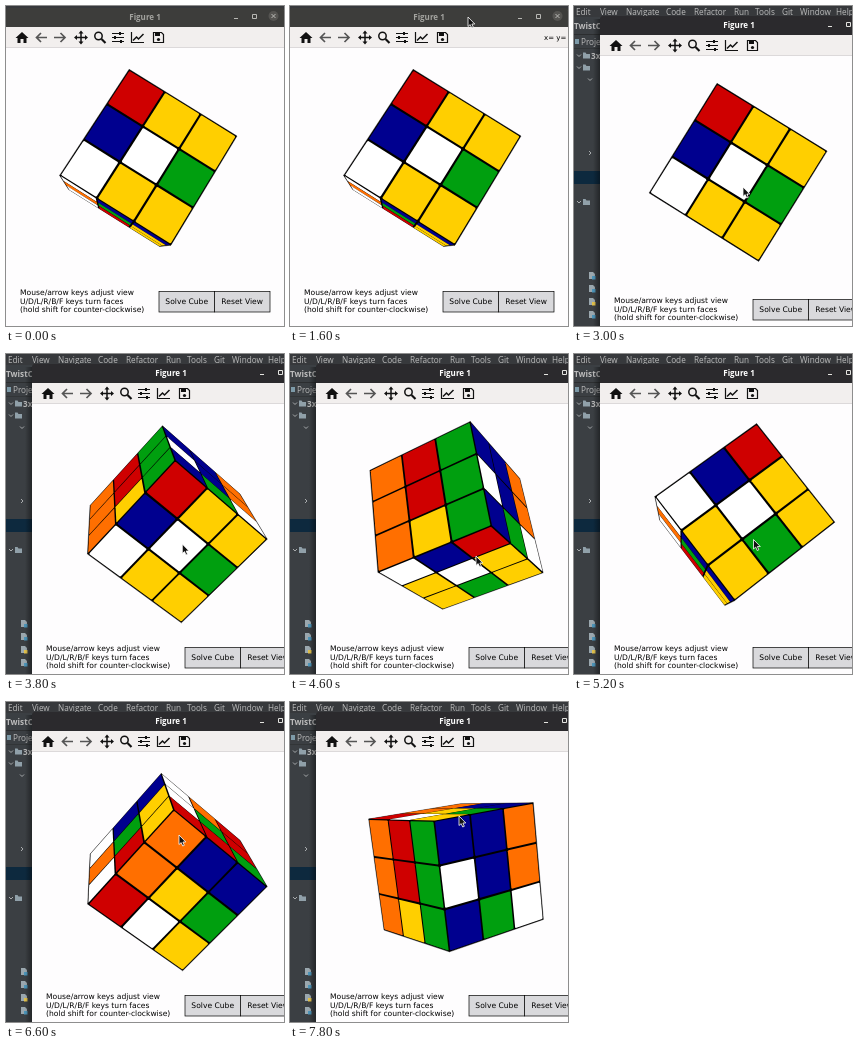
These frames come from a looping animation (278 by 320 pixels, 8000 ms). An HTML page:

```html
<!DOCTYPE html>
<html lang="en">
<head>
<meta charset="utf-8">
<title>Cube viewer</title>
<style>
  html, body { margin: 0; width: 100%; height: 100%; overflow: hidden; background: #3b3f43; }
  svg { display: block; width: 278px; height: 320px; }
  text { white-space: pre; }
  .ide { font-family: "Open Sans", sans-serif; font-size: 8.2px; fill: #bcbcbc; }
  .fig { font-family: "DejaVu Sans", sans-serif; font-size: 7.6px; fill: #000; }
  .title { font: bold 8px "Open Sans", sans-serif; text-anchor: middle; }
  .mid { text-anchor: middle; }
  .line { fill: none; stroke: #111; stroke-width: 1.5; }
</style>
</head>
<body>
<svg viewBox="0 0 278 320">
  <defs>
    <linearGradient id="shade"><stop offset="0" stop-opacity="0"/><stop offset="1" stop-opacity=".4"/></linearGradient>
  </defs>

  <g class="ide">
    <rect width="278" height="320" fill="#3b3f43"/>
    <rect width="278" height="11" fill="#37393c"/>
    <g id="menu"></g>
    <text x="0" y="23" font-weight="bold">TwistCube</text>
    <path d="M0 28.5H40" stroke="#2c2e30"/>
    <rect x="1" y="33" width="4" height="5" fill="#7d9aa8"/>
    <text x="7" y="39">Project</text>
    <path d="M0 42.5H40" stroke="#323537"/>
    <rect x="0" y="165" width="40" height="13" fill="#0d293e"/>
    <path d="M3 48.500l2 2 2-2M3 60.500l2 2 2-2M14 72.500l2 2 2-2M15 145l2 2-2 2M3 195l2 2 2-2" fill="none" stroke="#a8abad"/>
    <text x="17" y="53" font-weight="bold">3x3</text>
    <path d="M9 46.500h2.500l1 1.500h3.500v4.500h-7zM9 58.500h2.500l1 1.500h3.500v4.500h-7zM9 193h2.500l1 1.500h3.500v4.500h-7z" fill="#90a0a9"/>
    <g id="files"></g>
  </g>

  <g id="window">
    <rect x="-7" y="5" width="7" height="320" fill="url(#shade)"/>
    <path id="bar" d="M0 24V5Q0 2 3 2H275Q278 2 278 5V24Z"/>
    <text id="caption" class="title" x="139" y="13.800">Figure 1</text>
    <g id="controls" fill="none" stroke="#b8b8b4">
      <path d="M228 12.500h4M246.500 8.500h4v4h-4z"/>
      <circle cx="267.500" cy="10" r="5" fill="#555451" stroke="none"/>
      <path d="M265.500 8l4 4m0-4l-4 4"/>
    </g>
    <rect y="21" width="278" height="21" fill="#f2efee"/>
    <rect y="41" width="278" height="290" fill="#fefdfe"/>
    <path d="M0 41.500H278" stroke="#d4d1d1" stroke-width=".8"/>

    <path d="M9.500 32L16 26l6.500 6h-2v5h-3v-4h-3v4h-3v-5z" fill="#111"/>
    <path class="line" d="M41 31.500H30.500M35 27l-4.500 4.500 4.500 4.500M48 31.500h11M54.500 27l4.500 4.500-4.500 4.500" style="stroke:#555;stroke-width:1.700"/>
    <path class="line" d="M70 31.500h10M75 26.500v10"/>
    <path d="M75 24.500l2.500 3h-5zM75 38.500l2.500-3h-5zM68 31.500l3-2.500v5zM82 31.500l-3-2.500v5z" fill="#111"/>
    <circle class="line" cx="92.500" cy="30" r="3.700"/>
    <path class="line" d="M95.500 33l4 4" style="stroke-width:2.200"/>
    <path class="line" d="M106 27.500h12M106 31.500h12M106 35.500h12" style="stroke-width:1.200"/>
    <path d="M113 26h2v3h-2zM108 30h2v3h-2zM114 34h2v3h-2z" fill="#111"/>
    <path class="line" d="M125.500 26v10.500H138" style="stroke-width:1.200"/>
    <path class="line" d="M127 34.500l3.500-3.500 2 2 5-5"/>
    <path class="line" d="M147.500 26.500h8l2 2v8h-10z" style="stroke-width:1.200"/>
    <path d="M149 27h5v3h-5z" fill="#111"/>
    <circle cx="152.500" cy="33.500" r="1.600" fill="#111"/>
    <text id="coords" class="fig" x="254" y="34" style="font-size:7px">x= y=</text>

    <path id="body" fill="#000" stroke="#000" stroke-width=".4" stroke-linejoin="round"/>
    <g id="stickers"></g>

    <g class="fig">
      <text x="14" y="288.500">Mouse/arrow keys adjust view</text>
      <text x="14" y="297.500">U/D/L/R/B/F keys turn faces</text>
      <text x="14" y="306.300">(hold shift for counter-clockwise)</text>
      <g fill="#d9d9dc" stroke="#000" stroke-width=".7">
        <rect x="153" y="285.500" width="55.500" height="20.500"/>
        <rect x="208.500" y="285.500" width="55.500" height="20.500"/>
      </g>
      <text class="mid" x="180.700" y="298.300">Solve Cube</text>
      <text class="mid" x="236.200" y="298.300">Reset View</text>
    </g>
  </g>
  <path id="cursor" d="M0 0V9.500L2.200 7.600 3.700 11 5.300 10.300 3.900 7H6.800Z" fill="#111" stroke="#fff" stroke-width=".8"/>
</svg>
<script>
const LOOP = 8000, STEP = 200;
const HALF = 58.2, VIEW = 10, CENTER = [139.6, 159];
const COLORS = { W: '#fff', Y: '#ffcf00', B: '#00008f', G: '#009f0f', O: '#ff6f00', R: '#cf0000' };

const $ = id => document.getElementById(id);
function add(parent, tag, attrs, text = '') {
  const el = document.createElementNS('http://www.w3.org/2000/svg', tag);
  for (const k in attrs) el.setAttribute(k, attrs[k]);
  el.textContent = text;
  return parent.appendChild(el);
}

const menu = { Edit: 2, View: 26, Navigate: 52, Code: 92, Refactor: 120, Run: 160, Tools: 181, Git: 208, Window: 226, Help: 262 };
for (const name in menu) add($('menu'), 'text', { x: menu[name], y: 8.6 }, name);
for (let i = 0; i < 4; i++) {
  const y = 266 + 13 * i;
  add($('files'), 'path', { d: `M15 ${y}h4l2 2v5h-6z`, fill: '#9aa7ae' });
  add($('files'), 'rect', { x: 18, y: y + 4, width: 3.5, height: 3.5, fill: i === 2 ? '#e0c04c' : '#4c94b8' });
}

// Vector helpers
const dot = (a, b) => a[0] * b[0] + a[1] * b[1] + a[2] * b[2];
const cross = (a, b) => [a[1] * b[2] - a[2] * b[1], a[2] * b[0] - a[0] * b[2], a[0] * b[1] - a[1] * b[0]];
const mix = (a, b, k) => a.map((v, i) => v + (b[i] - v) * k);
const unit = v => { const n = Math.hypot(...v); return v.map(c => c / n); };
const sum = (a, b, k) => a.map((v, i) => v + b[i] * k);

// Axes of an orientation from its rough x and z directions
function axes(x, z) {
  z = unit(z);
  x = unit(sum(x, z, -dot(x, z)));
  return [x, cross(z, x), z];
}

// Shortest turn from one orientation to another, as axis and angle
function turnBetween(a, b) {
  const axis = [0, 1, 2].reduce((s, i) => sum(s, cross(a[i], b[i]), 1), [0, 0, 0]);
  const trace = [0, 1, 2].reduce((s, i) => s + dot(a[i], b[i]), 0);
  return { axis: unit(axis), angle: Math.acos(Math.min(1, (trace - 1) / 2)) };
}
function rotate(v, axis, angle) {
  const c = Math.cos(angle);
  return sum(sum(v.map(p => p * c), cross(axis, v), Math.sin(angle)), axis, dot(axis, v) * (1 - c));
}

const poses = [
  [2400, axes([.85, -.53, .026], [.062, .148, .987])],
  [3000, axes([.85, -.527, .04], [-.028, .014, 1])],
  [3200, axes([.85, -.527, .04], [-.028, .014, 1])],
  [4600, axes([.488, -.415, -.77], [.14, -.839, .526])],
  [5800, axes([.626, -.13, .77], [-.055, .974, .215])],
  [6600, axes([.66, .7, .245], [-.108, .41, -.905])],
  [7800, axes([.797, .207, -.57], [.11, -.974, -.18])]
];
const windowPath = [[1600, [0, 0]], [2000, [15, 6]], [2200, [24, 8]], [2400, [26, 8]]];
const cursorPath = [
  [1000, [200, 130]], [1600, [178, 11]], [2000, [193, 17]], [2200, [202, 19]], [2400, [204, 19]],
  [3000, [169, 181]], [3200, [169, 181]], [4600, [186, 202]], [5800, [173, 169]], [6600, [173, 133]], [7800, [169, 114]]
];

// Neighbouring keys around t and the progress between them
function span(keys, t) {
  let i = 0;
  while (i < keys.length - 2 && t >= keys[i + 1][0]) i++;
  const [t0, a] = keys[i], [t1, b] = keys[i + 1];
  return [a, b, Math.min(1, Math.max(0, (t - t0) / (t1 - t0)))];
}
const along = (keys, t) => mix(...span(keys, t));
function poseAt(t) {
  const [a, b, k] = span(poses, t);
  const { axis, angle } = turnBetween(a, b);
  return angle > 1e-4 ? a.map(v => rotate(v, axis, angle * k)) : a;
}

// Each face: direction of its columns, direction of its rows, colours by row
const X = [1, 0, 0], Y = [0, 1, 0], Z = [0, 0, 1];
const neg = v => v.map(c => -c);
const faces = [
  [X, neg(Y), 'RYYBWGWYY'],
  [X, neg(Z), 'WBBOGYWRY'],
  [Y, neg(Z), 'WORWGRRRG'],
  [Y, Z, 'ORGORGOYG'],
  [X, Z, 'BBOWBOBGW'],
  [Y, neg(X), 'OBBOYGRWY']
].map(([right, down, colors]) => ({
  right, down, normal: cross(down, right),
  tiles: [...colors].map(c => add($('stickers'), 'path', { fill: COLORS[c] }))
}));

const SQUARE = [[1, 1], [1, -1], [-1, -1], [-1, 1]];
const OUT = .95, IN = .91;
const TILE = [[OUT, IN], [OUT, -IN], [IN, -OUT], [-IN, -OUT], [-OUT, -IN], [-OUT, IN], [-IN, OUT], [IN, OUT]];

function drawCube(pose) {
  const place = v => [0, 1, 2].map(i => pose[0][i] * v[0] + pose[1][i] * v[1] + pose[2][i] * v[2]);
  const project = p => {
    const k = HALF * VIEW / (VIEW - p[2]);
    return `${(CENTER[0] + p[0] * k).toFixed(2)} ${(CENTER[1] - p[1] * k).toFixed(2)}`;
  };
  let plastic = '';
  for (const face of faces) {
    const [r, d, n] = [face.right, face.down, face.normal].map(place);
    const visible = n[2] * VIEW > 1;
    const outline = (shape, cx, cy, size) => 'M' + shape.map(([u, v]) =>
      project(sum(sum(n, r, cx + u * size), d, cy + v * size))).join('L') + 'Z';
    if (visible) plastic += outline(SQUARE, 0, 0, 1);
    face.tiles.forEach((tile, i) => tile.setAttribute('d', visible
      ? outline(TILE, (i % 3 - 1) * 2 / 3, (Math.floor(i / 3) - 1) * 2 / 3, 1 / 3) : ''));
  }
  $('body').setAttribute('d', plastic);
}

function draw(time) {
  const t = Math.floor(time % LOOP / STEP) * STEP;
  const focused = t > 1600;
  $('window').setAttribute('transform', `translate(${along(windowPath, t)})`);
  $('bar').setAttribute('fill', focused ? '#2b2a2d' : '#3d3d3b');
  $('caption').setAttribute('fill', focused ? '#fff' : '#a3a39f');
  $('controls').setAttribute('stroke', focused ? '#e4e4e0' : '#b8b8b4');
  $('coords').setAttribute('visibility', t >= 1000 ? 'visible' : 'hidden');
  $('cursor').setAttribute('visibility', t >= 1000 ? 'visible' : 'hidden');
  $('cursor').setAttribute('transform', `translate(${along(cursorPath, t)})`);
  drawCube(poseAt(t));
}

const start = performance.now();
function tick() {
  draw(performance.now() - start);
  requestAnimationFrame(tick);
}
tick();
</script>
</body>
</html>
```
